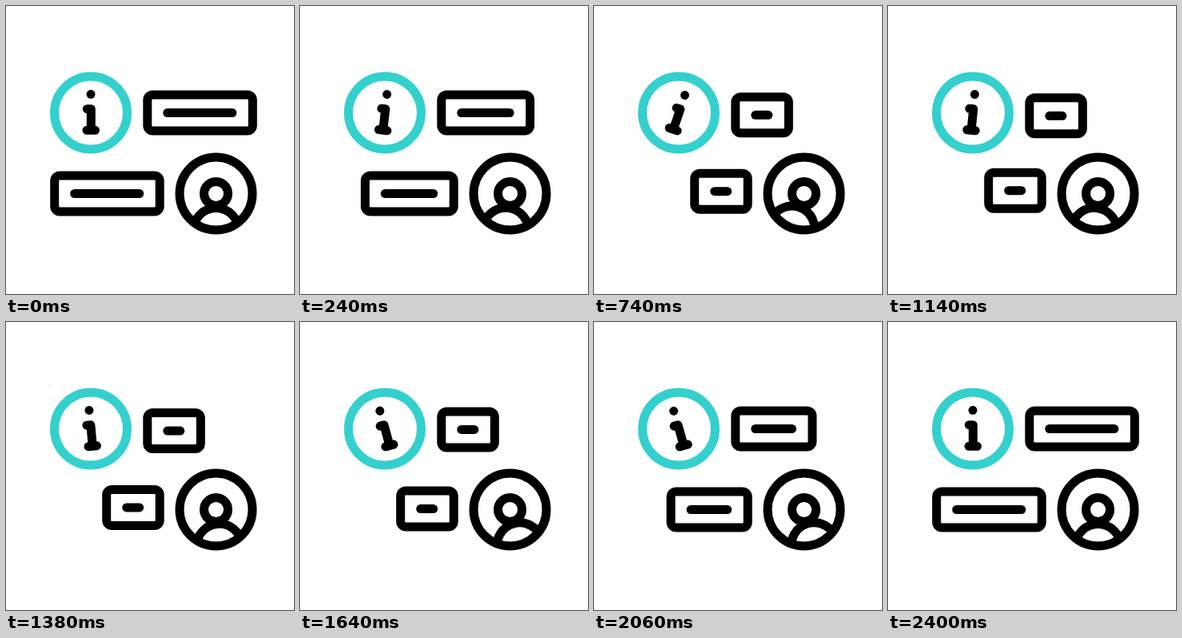
These frames come from a looping animation (360x360 px, 2.42 s). An HTML page:

```html
<!DOCTYPE html>
<html lang="en">
<head>
<meta charset="utf-8">
<title>Info chat</title>
<style>
html, body { margin: 0; width: 100%; height: 100%; overflow: hidden; background: #fff; }
svg { display: block; width: 100%; height: 100%; }
</style>
</head>
<body>
<svg viewBox="0 0 360 360" fill="none" stroke="#000" stroke-width="11" stroke-linecap="round" stroke-linejoin="round">
  <defs>
    <clipPath id="disc"><circle cx="262.5" cy="234.5" r="46"/></clipPath>
  </defs>
  <circle cx="106" cy="133.5" r="45.5" stroke="#33d0ce"/>
  <g id="info">
    <circle cx="106" cy="110.3" r="5.5" fill="#000" stroke="none"/>
    <path d="M101.3 128.7H106.3V155.3M101 155.3H111.5"/>
  </g>
  <g id="top">
    <rect x="176.8" y="111" height="45" rx="6.5"/>
    <path/>
  </g>
  <g id="bottom">
    <rect y="212" height="45" rx="6.5"/>
    <path/>
  </g>
  <g clip-path="url(#disc)">
    <circle id="body" cx="262.5" cy="281" r="28.5"/>
  </g>
  <circle cx="262.5" cy="234.5" r="15"/>
  <circle cx="262.5" cy="234.5" r="45.5"/>
</svg>
<script>
const LOOP = 2420;
const $ = sel => document.querySelector(sel);
const info = $('#info'), body = $('#body');
const top_ = $('#top'), bottom = $('#bottom');

// Eased interpolation through [time, value] keys
function track(t, keys) {
  for (let i = 1; i < keys.length; i++) {
    const [t0, v0] = keys[i - 1], [t1, v1] = keys[i];
    if (t <= t1) {
      const p = Math.max(0, (t - t0) / (t1 - t0));
      return v0 + (v1 - v0) * p * p * (3 - 2 * p);
    }
  }
  return keys[keys.length - 1][1];
}

const TILT = [[0, 0], [620, 20], [1920, -20], [2400, 0]];
const SHRINK = [[0, 0], [640, 65], [1760, 65], [2400, 0]];
const DRIFT = [[400, 0], [960, 4.2], [1940, 0]];

function setBox(group, x, width, lineY, dy) {
  const [rect, line] = group.children;
  rect.setAttribute('x', x);
  rect.setAttribute('width', width);
  line.setAttribute('d', `M${x + 25} ${lineY}H${x + width - 25.5}`);
  group.setAttribute('transform', `translate(0 ${dy})`);
}

function draw(t) {
  const tilt = track(t, TILT);
  const width = 131.5 - track(t, SHRINK);
  const dy = track(t, DRIFT);
  info.setAttribute('transform', `rotate(${tilt} 106 133.5)`);
  body.setAttribute('transform', `rotate(${tilt} 262.5 234.5)`);
  setBox(top_, 176.8, width, 133.5, dy);
  setBox(bottom, 192.2 - width, width, 234.5, -dy);
}

const start = performance.now();
function tick() {
  draw((performance.now() - start) % LOOP);
  requestAnimationFrame(tick);
}
draw(0);
requestAnimationFrame(tick);
</script>
</body>
</html>
```
